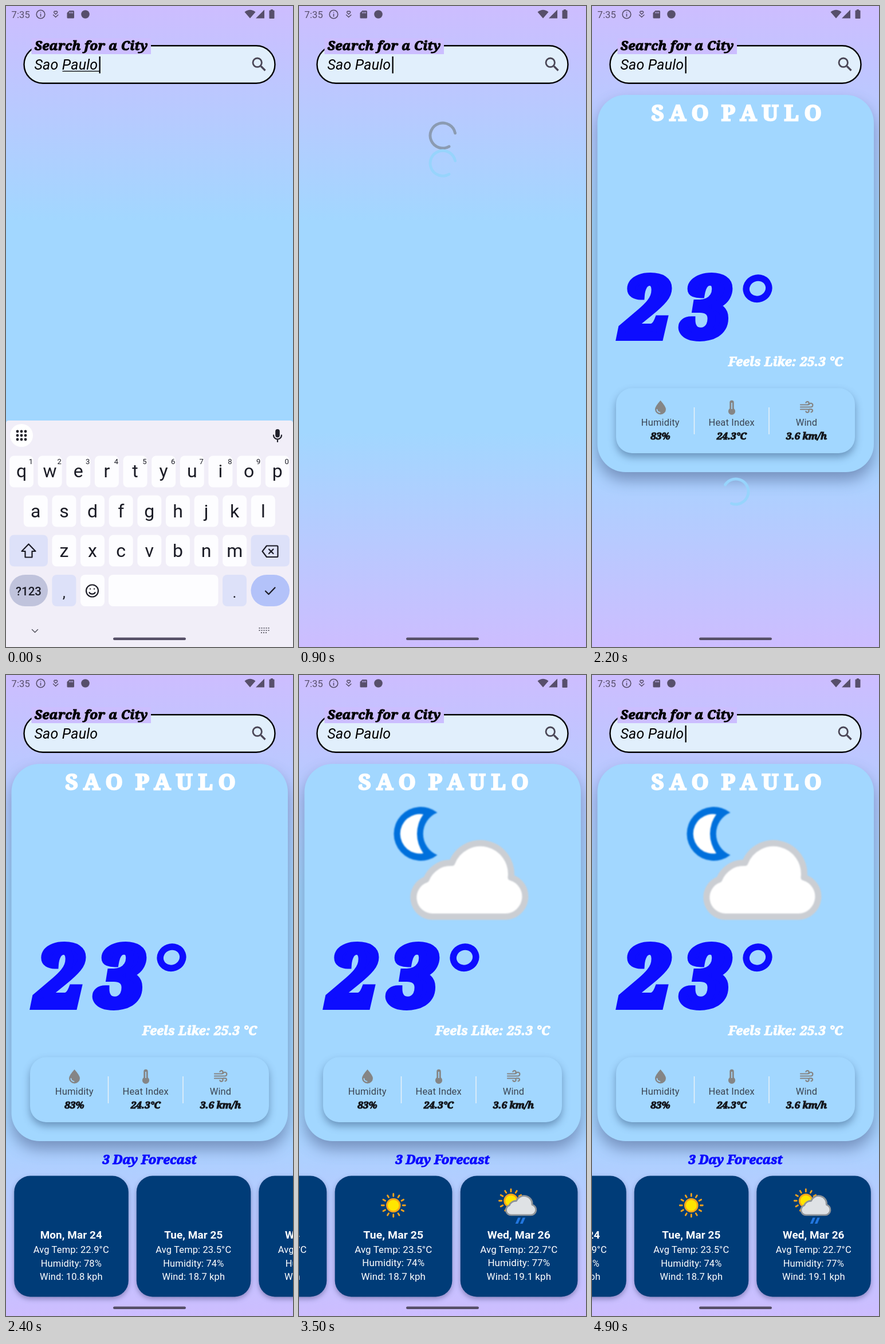
Animation, 501 px wide and 1118 px high, one loop 5000 ms. Source, as an HTML page:

```html
<!DOCTYPE html>
<html lang="en">
<head>
<meta charset="utf-8">
<title>Weather search</title>
<style>
  html, body { margin: 0; width: 100%; height: 100%; overflow: hidden; }
  svg { display: block; width: 501px; height: 1118px; font-family: Roboto, sans-serif; }
  .fat {
    font: italic 900 22px "Noto Serif", serif; letter-spacing: .3px;
    fill: currentColor; stroke: currentColor; stroke-width: 1.1px; stroke-miterlimit: 2;
  }
  .mid { text-anchor: middle; }
  .line { fill: none; stroke-linecap: round; stroke-linejoin: round; }
  .key { font-size: 32px; fill: #1a1b25; }
  .card { filter: drop-shadow(0 14px 13px rgba(45, 55, 100, .42)); }
  .panel { filter: drop-shadow(0 7px 7px rgba(30, 60, 100, .42)); }
  .day { filter: drop-shadow(0 4px 4px rgba(40, 40, 90, .38)); }
  #night { filter: blur(.9px); }
  #title { font: 900 38.5px "Noto Serif", serif; letter-spacing: 10px; word-spacing: -8px; stroke-width: 2.4px; }
  #degrees { font-size: 144px; stroke-width: 14px; letter-spacing: 0; }
</style>
</head>
<body>
<svg id="stage" viewBox="0 0 501 1118">
  <defs>
    <linearGradient id="sky" x1="0" y1="0" x2="0" y2="1">
      <stop offset="0" stop-color="#cdbdff"/>
      <stop offset=".335" stop-color="#a2d7ff"/>
      <stop offset=".665" stop-color="#a2d7ff"/>
      <stop offset="1" stop-color="#cdbdff"/>
    </linearGradient>
    <path id="cloud" stroke-width="11" stroke-linejoin="round"
      d="M233 421.5A33.5 33.5 0 0 1 222 356.5A46 46 0 0 1 267 327.5A53.5 53.5 0 0 1 370 353A35 35 0 0 1 361 421.5Z"/>
  </defs>
  <rect width="501" height="1118" fill="url(#sky)"/>

  <g id="status" fill="#574f6b">
    <text x="9.5" y="20.5" font-size="16.6" letter-spacing=".1">7:35</text>
    <g class="line" stroke="#574f6b" stroke-width="1.6">
      <circle cx="60.5" cy="14.5" r="7.3"/>
      <path d="M60.5 14v4M60.5 11v.1"/>
      <path d="M86.7 14.5l-2.6-2.5a1.7 1.7 0 0 1 2.6-2.2a1.7 1.7 0 0 1 2.6 2.2zM82.5 15.5l4.2 4l4.2-4" stroke-width="1.4"/>
    </g>
    <path d="M110.5 8h7a1.5 1.5 0 0 1 1.5 1.5v10.5a1.5 1.5 0 0 1-1.5 1.5h-9.5a1.5 1.5 0 0 1-1.5-1.5v-8z"/>
    <path d="M111 10v3M113.6 10v3M116.2 10v3" stroke="#c9bcf8" stroke-width="1.1"/>
    <circle cx="138.5" cy="14.5" r="7.3"/>
    <path d="M416.5 10.5q9.500-7.500 19 0L426 21.500zM451 6.500v15h-15zM462 7.500v-1.500h4v1.500h1.500q1 0 1 1v12.500q0 1-1 1h-7q-1 0-1-1v-12.500q0-1 1-1z"/>
  </g>

  <rect x="31.5" y="69.2" width="438" height="65.6" rx="32.8" fill="#e1effc" stroke="#000" stroke-width="2.4"/>
  <circle id="ripple" cx="442" cy="102" r="23" fill="#30304a"/>
  <rect x="44.5" y="56" width="208.5" height="28" fill="#ccbeff"/>
  <text class="fat mid" x="148.7" y="77" style="font-size:22.6px">Search for a City</text>
  <text x="49.5" y="111" font-size="25" font-style="italic" letter-spacing=".2">Sao Paulo</text>
  <rect id="compose" x="98.5" y="113" width="65" height="1.3"/>
  <rect id="caret" x="162.5" y="88" width="2.3" height="29.5"/>
  <path class="line" d="M445 105l7.5 7.5" stroke="#4a4656" stroke-width="3.2" style="stroke-linecap:butt"/>
  <circle class="line" cx="438.7" cy="98.7" r="7.7" stroke="#4a4656" stroke-width="2.8"/>

  <g id="weather">
    <rect class="card" x="9.5" y="155" width="482.5" height="658" rx="49" fill="#a2d7ff"/>
    <text class="fat" id="title" x="103.5" y="200" color="#fff">SAO PAULO</text>
    <g id="night">
      <path d="M241.5 240A47 47 0 1 0 241.5 314A40 40 0 0 1 241.5 240z" fill="#0070dc"/>
      <path d="M217 243A34.5 34.5 0 1 0 217 311A58 58 0 0 1 217 243z" fill="#fff"/>
      <use href="#cloud" fill="#fff" stroke="#cbced3"/>
    </g>
    <g class="fat mid" id="degrees" color="#0d0dff">
      <text x="92" y="577">2</text><text x="198" y="577">3</text>
    </g>
    <ellipse cx="289" cy="492.7" rx="20" ry="18.5" fill="none" stroke="#0d0dff" stroke-width="11.5" transform="rotate(-20 289 492.7)"/>
    <text class="fat mid" x="338" y="628" color="#fff">Feels Like: 25.3 °C</text>
    <rect class="panel" x="42" y="666.5" width="417" height="113.5" rx="28" fill="#a2d7ff"/>
    <path d="M178.5 700v47M309 700v47" stroke="#e9f2f8" stroke-width="1.5"/>
    <path d="M119.5 688q-9.5 10.5-9.5 15.5a9.5 9 0 0 0 19 0q0-5-9.5-15.5z" fill="#858585"/>
    <path class="line" d="M113.5 704a6 5 0 0 0 5 4.8" stroke="#a2d7ff" stroke-width="1.8"/>
    <path d="M240.3 691.5a3.7 3.7 0 0 1 7.4 0v10.5a6.1 6.1 0 1 1-7.4 0z" fill="#858585"/>
    <path d="M244 692v11" stroke="#a2d7ff" stroke-width="1.7"/>
    <path class="line" d="M364 695.5h12a2.7 2.7 0 1 0-2.6-3.600M364 699.500h18a3.300 3.300 0 1 0-3-4.600M364 703.500h12a2.700 2.700 0 1 1-2.600 3.600M379 703.300h3.500a2.500 2.500 0 0 1 0 5" stroke="#858585" stroke-width="2.200"/>
    <g id="facts"></g>
  </g>

  <g id="forecast">
    <text class="fat mid" x="250.5" y="853" color="#0d0dff" style="letter-spacing:0">3 Day Forecast</text>
    <g id="days"></g>
  </g>

  <g class="line" stroke-width="4.9">
    <path id="spinA" stroke="#8b9bb2"/>
    <path id="spinB" stroke="#97d4fc"/>
  </g>

  <g id="keyboard"></g>
  <rect x="187" y="1101.5" width="127" height="4.6" rx="2.3" fill="#554e66"/>
</svg>

<script>
const LOOP = 5000;
const $ = id => document.getElementById(id);
const clamp = x => Math.min(1, Math.max(0, x));
const span = (t, a, b) => clamp((t - a) / (b - a));
const easeOut = x => 1 - (1 - x) ** 3;
const smooth = x => x * x * (3 - 2 * x);

// cubic-bezier(.4, 0, .2, 1)
function standard(x) {
  let lo = 0, hi = 1;
  for (let i = 0; i < 24; i++) {
    const u = (lo + hi) / 2, v = 1 - u;
    if (1.2 * v * v * u + .6 * v * u * u + u ** 3 < x) lo = u; else hi = u;
  }
  return lo * lo * (3 - 2 * lo);
}

function buildFacts() {
  const facts = [[119.3, 'Humidity', '83%'], [243.7, 'Heat Index', '24.3°C'], [374.5, 'Wind', '3.6 km/h']];
  $('facts').innerHTML = facts.map(([x, name, value]) =>
    `<text class="mid" x="${x}" y="731.5" font-size="16.5" letter-spacing=".15" fill="#3b4452">${name}</text>
     <text class="fat mid" x="${x}" y="756" style="font-size:17px;letter-spacing:0" color="#15181d">${value}</text>`).join('');
}

function sun(x, y) {
  let rays = '';
  for (let i = 0; i < 12; i++) {
    const a = i * Math.PI / 6, c = Math.cos(a), s = Math.sin(a);
    rays += `M${x + 16 * c} ${y + 16 * s}L${x + 20 * c} ${y + 20 * s}`;
  }
  return `<path class="line" d="${rays}" stroke="#f5a31c" stroke-width="2.8"/>
    <circle cx="${x}" cy="${y}" r="11" fill="#ffe600" stroke="#f9a51b" stroke-width="2.8"/>`;
}

const rain = x => `<use href="#cloud" transform="translate(${x - 50.8} 831.5) scale(.262)" fill="#dfe2e5" stroke="#8f9499"/>
  <path d="M${x + 22} 946.5h4.5l-4.5 10.5h-4.5zM${x + 30} 946.5h4.5l-4.5 10.5h-4.5z" fill="#2277e0"/>`;

function buildDays() {
  const days = [
    ['Mon, Mar 24', '22.9', 78, '10.8', rain(73)],
    ['Tue, Mar 25', '23.5', 74, '18.7', sun(99.5, 925)],
    ['Wed, Mar 26', '22.7', 77, '19.1', sun(86, 917) + rain(76)]
  ];
  $('days').innerHTML = days.map(([date, temp, wet, wind, icon], i) => {
    const lines = [`Avg Temp: ${temp}°C`, `Humidity: ${wet}%`, `Wind: ${wind} kph`];
    return `<g transform="translate(${14.3 + 213.5 * i})">
      <rect class="day" y="873.5" width="199.5" height="211" rx="28" fill="#003c78"/>
      <g class="icon">${icon}</g>
      <g class="mid" fill="#fff"><text x="99.5" y="983" font-size="18.9" font-weight="700" letter-spacing=".1">${date}</text>
      ${lines.map((s, n) => `<text x="99.5" y="${1008 + 23.5 * n}" font-size="16.5" letter-spacing=".12">${s}</text>`).join('')}</g>
    </g>`;
  }).join('');
}

function buildKeyboard() {
  const STEP = 49.63;
  const cap = (x, y, w, fill = '#fdfdff', r = 8) =>
    `<rect x="${x}" y="${y}" width="${w}" height="55" rx="${r}" fill="${fill}"/>`;
  const label = (x, y, s, size = 32) => `<text class="key mid" x="${x}" y="${y}" style="font-size:${size}px">${s}</text>`;
  let out = `<path d="M0 1120V728q0-5 5-5H496q5 0 5 5V1120z" fill="#f1eef8"/>
    <circle cx="27" cy="749" r="20" fill="#fff"/>`;
  for (let i = 0; i < 9; i++)
    out += `<circle cx="${20 + i % 3 * 7}" cy="${742 + Math.floor(i / 3) * 7}" r="2.4" fill="#1f1f29"/>`;
  out += `<rect x="470.2" y="738" width="7.6" height="14.5" rx="3.8" fill="#1f1f29"/>
    <path class="line" d="M467 748.5a7 7.2 0 0 0 14 0M474 756v4" stroke="#1f1f29" stroke-width="2.2"/>`;
  const rows = [['qwertyuiop', 6, 784.5, 822], ['asdfghjkl', 30.8, 853.5, 892], ['zxcvbnm', 80.4, 922.5, 961]];
  rows.forEach(([keys, x0, y, base], row) => [...keys].forEach((ch, i) => {
    const x = x0 + STEP * i;
    out += cap(x, y, 42) + label(x + 21, base, ch);
    if (!row) out += label(x + 37.5, 799, (i + 1) % 10, 13);
  }));
  out += cap(6, 922.5, 67, '#dde1f9') + cap(427.5, 922.5, 67.5, '#dde1f9')
    + cap(6, 992, 67, '#c0c3dc', 27.5) + cap(80.4, 992, 42, '#dde1f9') + cap(130, 992, 42)
    + cap(179, 992, 191.5) + cap(378, 992, 42, '#dde1f9') + cap(427.5, 992, 67.5, '#b3c2f9', 27.5)
    + `<text class="key mid" x="39.5" y="1027.5" style="font-size:20.5px;font-weight:500">?123</text>`
    + label(101.4, 1032, ',', 26) + label(399, 1032, '.', 26)
    + `<g class="line" stroke="#1b1b25" stroke-width="2.2">
      <path d="M39.5 938.5l-12 12.5h6v10.5h12v-10.5h6z"/>
      <path d="M455 941.5h18q1.5 0 1.5 1.5v16.5q0 1.5-1.5 1.5h-18l-7.5-9.8zM459 947.5l7.5 7.5M466.5 947.5l-7.5 7.5"/>
      <circle cx="150.5" cy="1020" r="10.5"/>
      <path d="M145.5 1023a5.5 4.5 0 0 0 10 0M147 1016.7v.1M154 1016.7v.1"/>
      <path d="M453 1020.5l5.5 5.5l11-11.5"/>
      <path d="M45.5 1087.5l5 5l5-5" stroke="#5c5b66" stroke-width="1.6"/>
    </g>
    <g class="line" stroke="#6a6974" stroke-width="2" stroke-dasharray="2 2" style="stroke-linecap:butt">
      <path d="M441.5 1085h18M441.5 1089h18M445 1093h12"/></g>`;
  $('keyboard').innerHTML = out;
}

function arc(cy, ms) {
  const R = 22, CX = 251, turn = Math.floor(ms / 1332), p = ms / 1332 - turn;
  const head = 290 * standard(clamp(p * 2)), tail = 290 * standard(clamp(p * 2 - 1));
  const from = -90 + 216 * turn + 286 * p + tail, sweep = Math.max(.4, head - tail);
  const point = deg => {
    const a = deg * Math.PI / 180;
    return `${CX + R * Math.cos(a)} ${cy + R * Math.sin(a)}`;
  };
  return `M${point(from)}A${R} ${R} 0 ${sweep > 180 ? 1 : 0} 1 ${point(from + sweep)}`;
}

const show = (el, on) => el.style.display = on ? '' : 'none';

function render(t) {
  const loaded = t >= 1790, daysIn = t >= 2350;

  const hide = span(t, 40, 190);
  show($('keyboard'), hide < 1);
  $('keyboard').setAttribute('transform', `translate(0 ${395 * smooth(hide)})`);

  show($('compose'), t < 95);
  const beat = (t + 200) % 1000 < 500;
  show($('caret'), t < 95 || (t >= 700 && beat));

  $('ripple').setAttribute('r', 8 + 15 * easeOut(span(t, 40, 190)));
  $('ripple').setAttribute('opacity', t < 40 ? 0 : .07 * (1 - span(t, 250, 600)));

  const ms = 130 + (t - 200) * .804, spinning = ms > 0 && !daysIn;
  show($('spinA'), spinning && !loaded);
  show($('spinB'), spinning);
  if (spinning) {
    $('spinA').setAttribute('d', arc(226, ms));
    $('spinB').setAttribute('d', arc(loaded ? 847 : 274.3, ms));
  }

  show($('weather'), loaded);
  show($('night'), t >= 2550);
  show($('forecast'), daysIn);
  icons.forEach(el => show(el, t >= 2650));

  // scroll to the end, then stretch against the right edge and relax
  const scroll = 154 * smooth(span(t, 3110, 3420));
  const pull = 1 + .026 * easeOut(span(t, 3380, 3500)) * (1 - smooth(span(t, 3650, 4250)));
  $('days').setAttribute('transform', `translate(${501 - 501 * pull} 0) scale(${pull} 1) translate(${-scroll} 0)`);
}

buildFacts();
buildDays();
buildKeyboard();
const icons = document.querySelectorAll('.icon');
const start = performance.now();
function tick() {
  render((performance.now() - start) % LOOP);
  requestAnimationFrame(tick);
}
render(0);
requestAnimationFrame(tick);
</script>
</body>
</html>
```
